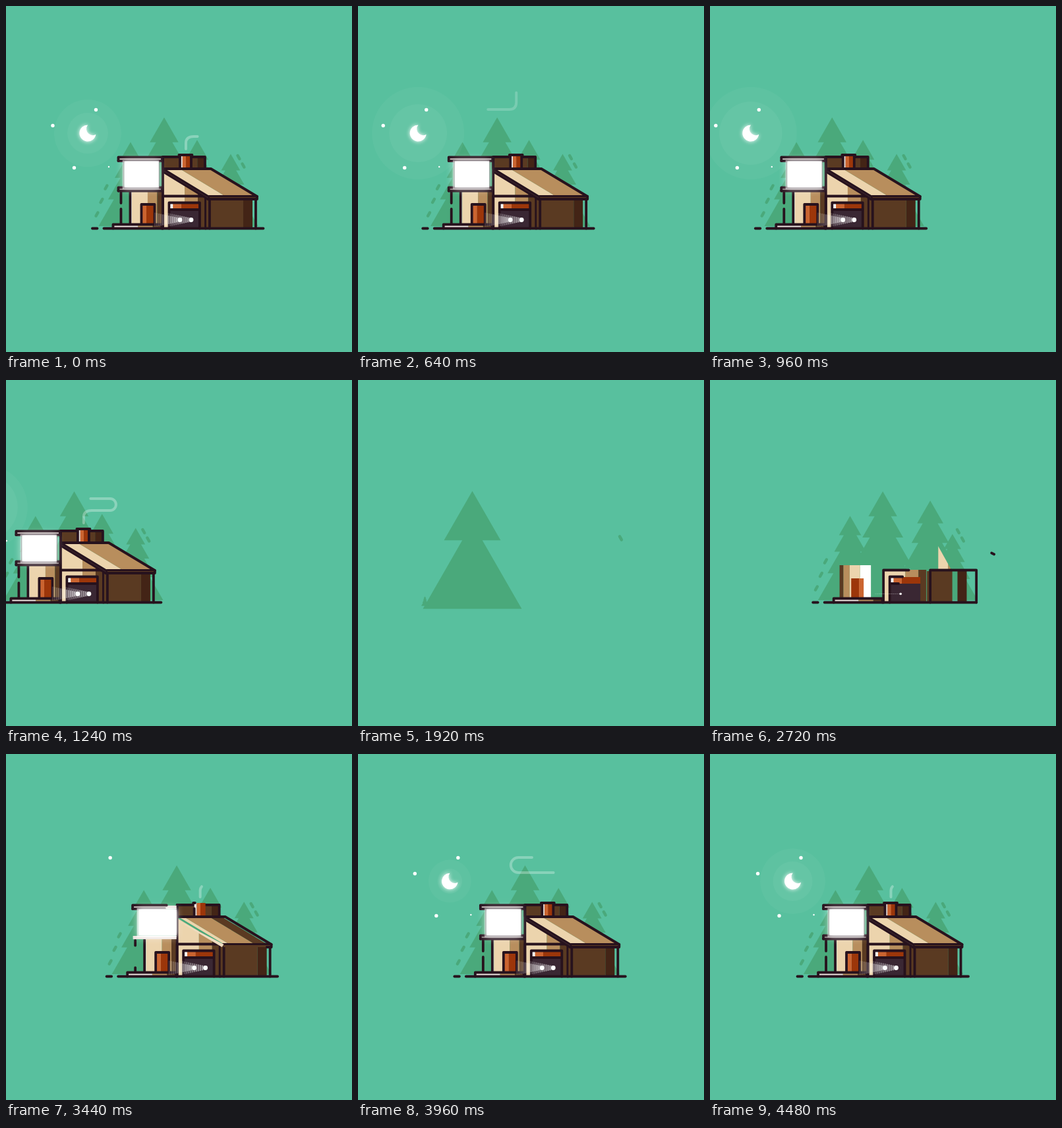
An HTML page with a canvas for the animation above (4.52 s loop, 525 px wide and 525 px high).

```html
<!DOCTYPE html>
<html lang="en">
<head>
<meta charset="utf-8">
<title>House at night</title>
<style>
html, body { margin: 0; width: 100%; height: 100%; overflow: hidden; background: #58c09e; }
canvas { display: block; }
</style>
</head>
<body>
<canvas id="stage" width="525" height="525"></canvas>
<script>
const c = document.getElementById('stage').getContext('2d');
const LOOP = 4520, GROUND = 337.5, BG = '#58c09e', LEAF = '#4aa97b', INK = '#27121d';
const WHITE = '#fff', PALE = '#eee4e0', BEIGE = '#ecd4ad', TAN = '#b88e5d', BROWN = '#5a3a22', DARK = '#432416';
const ORANGE = '#cb6430', RED = '#9c360a', PLUM = '#3a2733';
let T = 0; // scene clock: build-up from 1760, departure after LOOP

const prog = (start, dur) => Math.min(1, Math.max(0, (T - start) / dur));
const out = p => 1 - (1 - p) ** 3;
const ease = (start, dur) => out(prog(start, dur));
const spring = t => t > 0 ? 1 - Math.exp(-t / 150) * Math.cos(t * Math.PI / 300) : 0;
const mix = (a, b, p) => a + (b - a) * p;

// slow sideways drift that turns into a quick exit
const drift = t => 27 - 27 * Math.exp(t * (t < 0 ? .0015 : .00124)) - 1.42e-6 * Math.max(0, t - 900) ** 3;

function rect(color, x, y, w, h) {
  c.fillStyle = color;
  c.fillRect(x, y, w, h);
}
// side-by-side shades, each `ratio` times as wide as the one before
function bands(x, y, w, h, ratio, ...colors) {
  let part = w / colors.reduce((sum, _, i) => sum + ratio ** i, 0);
  for (const color of colors) {
    rect(color, x, y, part, h);
    x += part;
    part *= ratio;
  }
}
function trace(...p) {
  c.beginPath();
  for (let i = 0; i < p.length; i += 2) c.lineTo(p[i], p[i + 1]);
}
function dot(x, y, r, color = WHITE) {
  c.beginPath();
  c.arc(x, y, Math.max(0, r), 0, 7);
  c.fillStyle = color;
  c.fill();
}
// outline that draws itself along its points
function line(start, ...p) {
  const k = prog(start, 300);
  if (!k) return;
  let len = 0;
  for (let i = 2; i < p.length; i += 2) len += Math.hypot(p[i] - p[i - 2], p[i + 1] - p[i - 1]);
  trace(...p);
  c.setLineDash(k < 1 ? [len * k, 9999] : []);
  c.strokeStyle = INK;
  c.lineWidth = 3.8;
  c.stroke();
  c.setLineDash([]);
}
// box outline without its bottom edge
const arch = (start, x, y, w, h) => line(start, x, y + h, x, y, x + w, y, x + w, y + h);

function scaled(x, y, sx, sy, draw) {
  if (!sx || !sy) return;
  c.save();
  c.translate(x, y);
  c.scale(sx, sy);
  c.translate(-x, -y);
  draw();
  c.restore();
}
const rise = (start, y, draw) => scaled(0, y, 1, ease(start, 220), draw);
// swings open mirrored first, then the right way round
function flip(start, pivot, draw) {
  const p = prog(start, 520);
  const s = p < .6 ? -Math.sin(Math.PI * p / .6) : Math.sin(Math.PI / 2 * (p - .6) / .4);
  scaled(pivot, 0, s, 1, draw);
}

// four stacked triangles; `puff` blends towards a swollen two-tier shape
function tree(x, size, puff = 0) {
  const top = 334 - 163 * size;
  c.beginPath();
  for (let i = 0; i < 4; i++) {
    const d = mix(size * (37 + 27 * i + 5 * i * i), i ? 178 : 74, puff);
    const w = mix(size * 21.5 * 1.425 ** i, i ? 75 : 43, puff);
    c.moveTo(x, top + d - 1.74 * w);
    c.lineTo(x + w, top + d);
    c.lineTo(x - w, top + d);
    c.closePath();
  }
  c.fillStyle = LEAF;
  c.fill();
}
function bigTree(x) {
  const q = ease(1930, 360), k = ease(1760, 160) * (1 + .25 * Math.sin(Math.PI * q));
  const cx = mix(147, 240, q) + x * mix(1, .88, q);
  scaled(cx, mix(348, 334, q), k, k, () => tree(cx, 1.01, 1 - q));
}
function sideTree(x, size, start) {
  const s = spring(T - start), cx = x + 130 * (spring(1.2 * (T - start)) - 1);
  scaled(cx, 334 + 11 * Math.max(0, 1 - s), s, s, () => tree(cx, size));
}
function leaf(x, y, lean, start) {
  const p = ease(start, 300);
  if (!p) return;
  x += lean * 140 * (1 - p);
  y += 70 * (1 - p);
  c.strokeStyle = LEAF;
  c.lineWidth = 4.5;
  trace(x - lean * 1.4, y - 2.5, x + lean * 1.4, y + 2.5);
  c.stroke();
}
function forest(x) {
  bigTree(x);
  c.save();
  c.translate(x * .93, 0);
  sideTree(189, .78, 1905);
  sideTree(290, .8, 2500);
  sideTree(341, .67, 2590);
  for (let i = 0; i < 2; i++) leaf(353 + 7 * i, 229.5 + 12.5 * i, 1, 1780 + 180 * i);
  for (let i = 0; i < 3; i++) leaf(152 - 7 * i, 275 + 20.5 * i, -1, 2300 + 40 * i);
  c.restore();
}

function moon() {
  const s = ease(3640, 440), u = T - LOOP;
  dot(124, 193, s * (51 + 20 * Math.sin(u * Math.PI / 1600)), 'rgba(255,255,255,.035)');
  dot(124, 193, s * (31 + 18 * Math.sin(u * Math.PI / 2480)), 'rgba(255,255,255,.045)');
  scaled(124, 193, s, s, () => {
    const a = -.714; // direction of the bite
    c.shadowColor = WHITE;
    c.shadowBlur = 6;
    c.beginPath();
    c.arc(124, 193, 12.5, a + .846, a - .846 + 2 * Math.PI);
    c.arc(131.5, 186.5, 9.5, a + Math.PI + 1.398, a + Math.PI - 1.398, true);
    c.fillStyle = WHITE;
    c.fill();
  });
  [[136.5, 157.5], [71, 181.5], [103.5, 245.5], [156, 244]].forEach(([x, y], i) =>
    dot(x, y, (i < 3 ? 2.7 : 1.2) * ease(3320 + 120 * i, 120)));
}

const plume = new Path2D('M273 217V208Q273 198 285 198H313A9 9 0 0 0 313 180H228A11.5 11.5 0 0 1 228 157H262Q273 157 273 146V130');
function smoke() {
  if (T < 3400) return;
  const age = (T - 3440 + 1040) % 1040;
  const head = Math.min(270, 16 + .4 * age), tail = Math.max(0, (age - 320) * .57);
  if (tail >= head) return;
  c.setLineDash([head - tail, 9999]);
  c.lineDashOffset = -tail;
  c.strokeStyle = `rgba(255,255,255,${.3 * Math.min(1, (1000 - age) / 500)})`;
  c.lineWidth = 4;
  c.stroke(plume);
  c.setLineDash([]);
  c.lineDashOffset = 0;
}

function upper() {
  rise(2960, 247, () => bands(238, 229, 64, 18, .6, BROWN, BROWN, DARK));
  arch(3100, 238, 229, 64, 17);
  rise(3200, 247, () => bands(264, 226, 17, 21, 1.4, PALE, ORANGE, RED));
  arch(3380, 264, 226, 17, 20);
  line(3400, 262.5, 226, 282.5, 226);
}

function leftWing() {
  const p = prog(2560, 520), shine = mix(23, 2, p);
  flip(2560, 204, () => {
    rect(WHITE, 189, 281, shine, 50);
    bands(189 + shine, 281, mix(24, 47, p), 50, .6, BEIGE, TAN, BROWN);
  });
  line(2900, 188.5, 331, 188.5, 282);
  flip(2575, 207, () => bands(206, 301, 19, 30, 1.7, ORANGE, RED));
  arch(2900, 205.5, 301, 20, 30);
  rise(2440, GROUND, () => bands(163, 332, 73, 4, .6, PALE, TAN, BROWN));
  arch(2400, 162.5, 331.5, 74, 6);
  line(3360, 174.5, 330, 174.5, 308);
  line(3300, 174.5, 283, 174.5, 299);
}

function garage() {
  const s = ease(2640, 700);
  scaled(358, 288, s, Math.min(1, 3 * s), () => {
    trace(238, 249, 238, 288, 303, 288);
    c.clip();
    bands(238, 249, 65, 39, mix(.1, .6, s), BEIGE, TAN, BROWN);
  });
  rise(2480, GROUND, () => {
    bands(238, 288, 65, 49, .6, BEIGE, TAN, BROWN);
    rect(PLUM, 247, 309, 47, 28);
    bands(248, 299, 46, 10, 2.3, WHITE, ORANGE, RED);
  });
  arch(2560, 238, 288.5, 65, 49);
  arch(2580, 247.5, 298.5, 46.5, 39);
  line(2640, 249, 309, 293, 309);
}

function rightWing() {
  const q = ease(2560, 530);
  if (q) {
    rect(BROWN, 304, 290, 4 + 52 * q, 47);
    rect(DARK, 308 + 52 * Math.sqrt(q), 290, 14, 47);
  }
  arch(2420, 309, 288.5, 70, 49);
}

function roof() {
  const k = prog(3380, 280), w = mix(64, 71, k), spare = 24 * (1 - k);
  rise(2860, 288, () => {
    c.transform(1, 0, 1.66, 1, -1.66 * 247, 0);
    bands(240, 247, w - spare, 41, mix(5.5, 2, k), BEIGE, TAN);
    rect(BROWN, 240 + w - spare, 247, spare, 41);
  });
  line(2900, 239, 247, 311, 247, 381, 289, 308, 289);
  if (T > 3360) {
    const slip = 14 * (1 - k);
    trace(239 - slip, 247, 239, 253, 306, 293, 309, 289);
    c.fillStyle = '#efdcc0';
    c.fill();
    rect(BROWN, 308, 290, 73, 3);
  }
  for (const y of [0, 4]) line(3460, 238.5, 247.5 + y, 307.5, 289.5 + y);
  line(3400, 381, 289, 381, 293, 306, 293);
  // outline pieces on their way in
  for (const start of [2600, 2860]) {
    const p = prog(start, 220), x = mix(481, 341, p), y = mix(280, 250, p);
    if (p > 0 && p < 1) line(0, x - 2, y - 1, x + 2, y + 1);
  }
}

function lamps() {
  const open = mix(.06, 1, ease(2730, 320));
  for (let i = 0; i < 2; i++) {
    const x = 264 + 17 * i, p = ease(2640 + 120 * i, 100);
    if (!p) continue;
    for (let d = 0; d < 42; d += 3) {
      const h = (5 + d * .43) * open;
      rect(`rgba(255,255,255,${.6 * (1 - d / 50)})`, x - d, 324.5 - h / 2, 2.4, h);
    }
    dot(x, 324.5, 1.7 * p * (1 + open));
  }
}

function bigWindow() {
  const p = ease(3120, 260), k = prog(3440, 240), w = mix(57, 52, k);
  line(2980, 238, GROUND, 238, 229);
  if (!p) return;
  for (const y of [230, 276]) rect(PALE, 171, y, 66, 5 * p);
  arch(3220, 170.5, 229.5, 66.5, 5.5);
  line(3220, 170.5, 235, 237, 235);
  arch(3450, 170.5, 275.5, 66.5, 5);
  line(3450, 170.5, 280.5, 237, 280.5);
  c.save();
  c.shadowColor = WHITE;
  c.shadowBlur = 11;
  rect('rgba(255,255,255,.6)', 177, 234, w + 3, 44 * p);
  c.shadowBlur = 5;
  rect(WHITE, 180, 236, w, 39 * p);
  c.restore();
  c.strokeStyle = `rgba(90,75,80,${.35 * k})`;
  c.lineWidth = 1.5;
  c.strokeRect(178.5, 234.5, 54, 42);
}

function ground() {
  const end = mix(148.5, 390.5, prog(2340, 400));
  if (T > 2340) line(0, 148.5, GROUND, end, GROUND);
  line(2380, 131, GROUND, 138.5, GROUND);
}

function frame() {
  const t = performance.now() % LOOP;
  T = t < 1500 ? t + LOOP : t;
  rect(BG, 0, 0, 525, 525);
  c.lineCap = c.lineJoin = 'round';
  if (T >= 1760) {
    const x = drift(T - LOOP);
    forest(x);
    c.save();
    c.translate(x, 0);
    [moon, smoke, upper, leftWing, garage, rightWing, roof, bigWindow, lamps, ground].forEach(part => part());
    c.restore();
  }
  requestAnimationFrame(frame);
}
frame();
</script>
</body>
</html>
```
